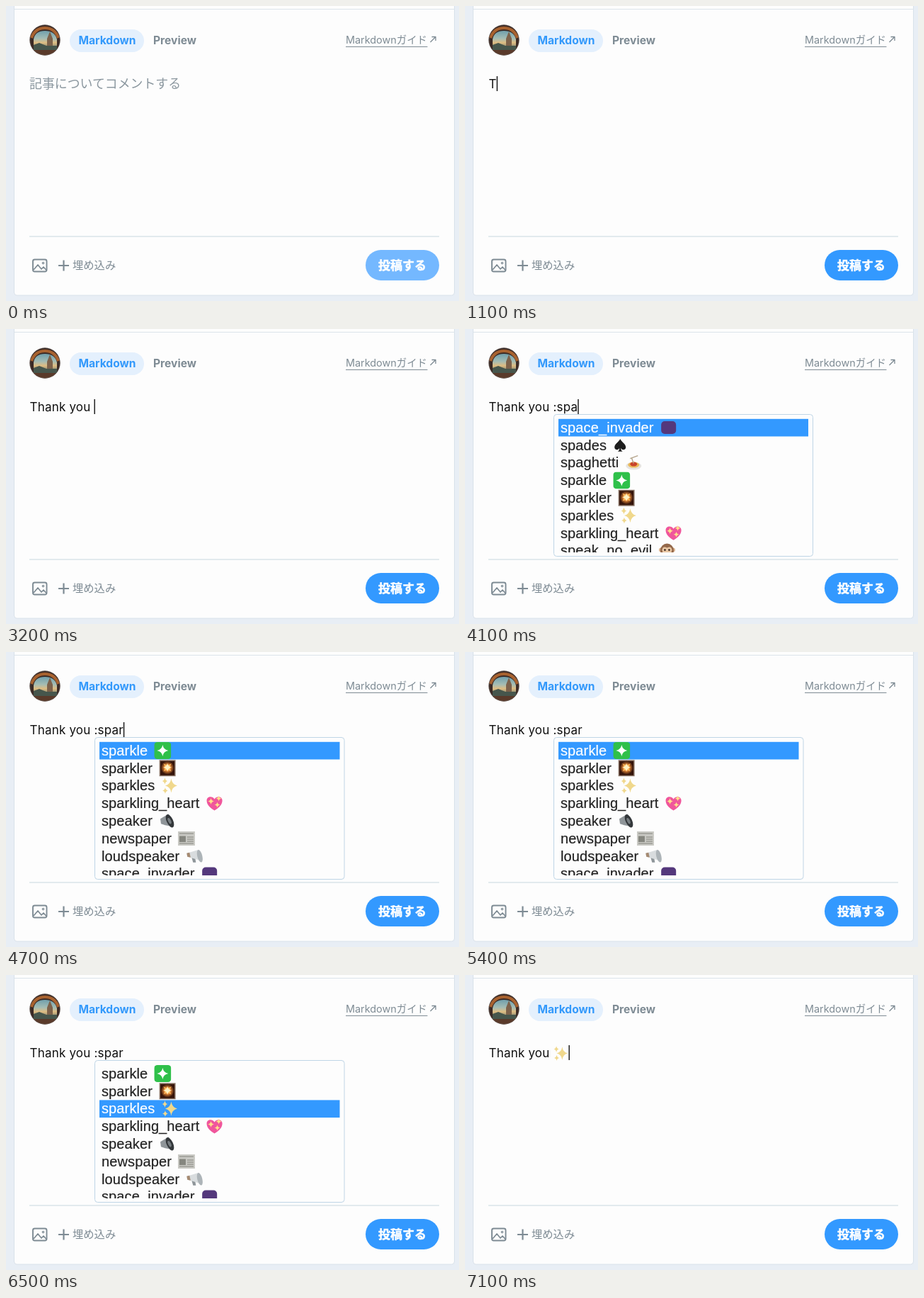
Write an HTML page that moves like this. It is 640x416 px and loops after 7.2 s.

```html
<!DOCTYPE html>
<html lang="ja">
<head>
<meta charset="utf-8">
<title>Comment editor</title>
<style>
  html, body { margin: 0; width: 100%; height: 100%; overflow: hidden; background: #e8eef5; }
  svg { display: block; }
  text { font-family: Inter, "Noto Sans CJK JP", "Noto Sans CJK", sans-serif; fill: #7e8b94; }
  .tab { font-size: 15.6px; font-weight: 700; }
  .link { font-size: 14.4px; }
  .hint { font-size: 17.9px; fill: #8b979f; }
  .typed { font-size: 17px; letter-spacing: .2px; fill: #111; }
  .embed { font-size: 15.3px; }
  .send { font-size: 17px; font-weight: 700; fill: #fff; stroke: #fff; stroke-width: .5; }
  .item { font: 20px "Liberation Sans", Arial, sans-serif; letter-spacing: .12px; fill: #222; stroke: #222; stroke-width: .2; }
  .item.on { fill: #fff; stroke: #fff; }
  .icon { fill: none; stroke: #7e8b94; stroke-width: 1.900; stroke-linejoin: round; }
</style>
</head>
<body>
<svg width="640" height="416" viewBox="0 0 640 416">
  <defs>
    <clipPath id="face"><circle cx="55" cy="48" r="21.5"/></clipPath>
    <clipPath id="listClip"><rect x="125" y="121" width="370" height="194"/></clipPath>
    <linearGradient id="sky" x1="0" y1="0" x2="0" y2="1">
      <stop offset="0" stop-color="#6f9fac"/>
      <stop offset=".4" stop-color="#a5bdb4"/>
      <stop offset=".62" stop-color="#dfbd82"/>
      <stop offset="1" stop-color="#4f6a6b"/>
    </linearGradient>
    <radialGradient id="glow">
      <stop offset="0" stop-color="#fff0c0"/>
      <stop offset=".4" stop-color="#f3913a"/>
      <stop offset="1" stop-color="#35140a"/>
    </radialGradient>
    <path id="star" d="M0-1Q.15-.15 1 0Q.15.15 0 1Q-.15.15-1 0Q-.15-.15 0-1Z"/>

    <symbol id="space_invader" viewBox="0 0 24 24"><rect x="1.500" y="3" width="21" height="18" rx="5" fill="#54387c"/></symbol>
    <symbol id="spades" viewBox="0 0 24 24">
      <path fill="#1d1d1d" d="M10 3C9 7 2 10 2 15C2 19 7 20 9 16Q9 20 6.500 21H13.500Q11 20 11 16C13 20 18 19 18 15C18 10 11 7 10 3Z"/>
    </symbol>
    <symbol id="spaghetti" viewBox="0 0 24 24">
      <ellipse cx="12" cy="16.500" rx="11" ry="5.500" fill="#e6e4e0"/>
      <ellipse cx="12" cy="15" rx="8" ry="4" fill="#eab95a"/>
      <ellipse cx="12" cy="14" rx="5" ry="3" fill="#c9432a"/>
      <path d="M12 13L9 5M7 6L18 2" stroke="#b5a58c" stroke-width="1.500" fill="none"/>
    </symbol>
    <symbol id="sparkle" viewBox="0 0 24 24">
      <rect width="24" height="24" rx="4.500" fill="#2fc04a"/>
      <use href="#star" transform="translate(12 12) scale(8)" fill="#fff"/>
    </symbol>
    <symbol id="sparkler" viewBox="0 0 24 24">
      <rect x=".5" y=".5" width="23" height="23" fill="#8a7567"/>
      <rect x="2" y="2" width="20" height="20" fill="#35140a"/>
      <circle cx="12" cy="11.500" r="9.500" fill="url(#glow)"/>
      <use href="#star" transform="translate(12 11) rotate(45) scale(8)" fill="#ffb85c"/>
      <use href="#star" transform="translate(12 11) scale(6)" fill="#fff3c4"/>
    </symbol>
    <symbol id="sparkles" viewBox="0 0 24 24">
      <g fill="#f0d88c">
        <use href="#star" transform="translate(14 12) scale(8.500 10)"/>
        <use href="#star" transform="translate(5 5.500) scale(4 5)"/>
        <use href="#star" transform="translate(5.500 19) scale(4 4.500)"/>
      </g>
    </symbol>
    <symbol id="sparkling_heart" viewBox="0 0 24 24">
      <path fill="#f0569c" d="M12 22C4 17 1 13 1 8C1 2 9 1 12 6C15 1 23 2 23 8C23 13 20 17 12 22Z"/>
      <g fill="#ffe08a">
        <use href="#star" transform="translate(7 9) scale(4.500)"/>
        <use href="#star" transform="translate(16 14) scale(4)"/>
        <use href="#star" transform="translate(18 5) scale(4)"/>
      </g>
    </symbol>
    <symbol id="speak_no_evil" viewBox="0 0 24 24">
      <g fill="#dcb48f"><circle cx="3.500" cy="11" r="3"/><circle cx="20.500" cy="11" r="3"/></g>
      <circle cx="12" cy="11.500" r="9.500" fill="#94684a"/>
      <path fill="#e8c6a3" d="M5 11Q6 5 12 8Q18 5 19 11Q18 18 12 18Q6 18 5 11Z"/>
      <g fill="#33221a"><circle cx="9" cy="11" r="1.300"/><circle cx="15" cy="11" r="1.300"/></g>
      <ellipse cx="12" cy="18" rx="7" ry="3.500" fill="#94684a"/>
    </symbol>
    <symbol id="speaker" viewBox="0 0 24 24">
      <path fill="#8f9599" d="M2 9L7 6L14 2L20 20L9 18L3 16Z"/>
      <ellipse cx="15.500" cy="12" rx="4.500" ry="10" transform="rotate(-25 15.500 12)" fill="#34383b"/>
      <ellipse cx="15" cy="12" rx="2" ry="4.500" transform="rotate(-25 15 12)" fill="#777d81"/>
    </symbol>
    <symbol id="newspaper" viewBox="0 0 24 24">
      <rect y="2" width="24" height="20" fill="#c9c9c4"/>
      <path d="M2 5H22M2 19H22M13 10H22M13 13H22M13 16H22" stroke="#9a9a94" stroke-width="1.500"/>
      <rect x="2" y="8.500" width="9" height="8.500" fill="#85867f"/>
    </symbol>
    <symbol id="loudspeaker" viewBox="0 0 24 24">
      <path d="M8 14L10 21H14L13 15" fill="#8e9599"/>
      <path fill="#d8dcde" d="M1 8L5 7L18 3L22 19L6 14L2 13Z"/>
      <ellipse cx="19.500" cy="12" rx="3.500" ry="9" transform="rotate(-14 19.500 12)" fill="#adb4b8"/>
      <path d="M1 8L5 7L6.500 14L2 13Z" fill="#a58a72"/>
    </symbol>
  </defs>

  <rect width="640" height="416" fill="#e8eef5"/>
  <rect x="11.500" y="-10" width="622" height="418" rx="4" fill="#fdfdfd" stroke="#d9e2ea"/>
  <path d="M12 4.500H633" stroke="#dbe4ea"/>

  <g clip-path="url(#face)">
    <rect x="33" y="26" width="44" height="44" fill="#3b2a25"/>
    <path d="M39 62V47Q41 35 55 35Q69 35 72 47V62Z" fill="url(#sky)"/>
    <path d="M36 45Q41 31 55 31Q69 31 74 45" fill="none" stroke="#a8622f" stroke-width="4"/>
    <path d="M58 61V46L62 36L66 46V61Z" fill="#7d624b"/>
    <path d="M39 55L47 52L57 56H72V63H39Z" fill="#46564c"/>
    <path d="M33 62H77V70H33Z" fill="#5a3a2a"/>
  </g>
  <circle cx="55" cy="48" r="21.300" fill="none" stroke="#6f6661" stroke-width=".6"/>

  <rect x="90" y="33" width="105" height="32" rx="16" fill="#e4f0fd"/>
  <text class="tab" x="102.500" y="54" style="fill:#3399fb">Markdown</text>
  <text class="tab" x="208" y="54">Preview</text>
  <text class="link" x="480" y="52.500">Markdownガイド</text>
  <path d="M480 57.500H595.500" stroke="#7e8b94"/>
  <path class="icon" style="stroke-width:1.300" d="M599.500 51L607 43.500M601.500 43.500H607V49"/>

  <text id="hint" class="hint" x="33" y="116">記事についてコメントする</text>
  <text id="typed" class="typed" x="33.500" y="116"></text>
  <use id="emoji" href="#sparkles" y="99.500" width="22" height="22"/>
  <rect id="caret" y="99" width="1.400" height="21" fill="#111"/>

  <path d="M33 325H612" stroke="#dae5ea" stroke-width="1.500"/>
  <g class="icon">
    <rect x="38" y="357.500" width="19.500" height="17" rx="2.500"/>
    <path d="M39 372L45 365L50 371L53 368L57.500 373" stroke-width="1.700"/>
    <circle cx="52.500" cy="362.500" r="1.200" stroke-width="1.200"/>
    <path d="M74 366H89M81.500 358.500V373.500" stroke-width="2.200"/>
  </g>
  <text class="embed" x="94" y="371.300">埋め込み</text>
  <rect id="send" x="508" y="344" width="104" height="43" rx="21.500"/>
  <text class="send" x="526" y="371.500">投稿する</text>

  <g id="menu">
    <rect id="box" x="125.500" y="120.500" height="200" rx="4" fill="#fdfdfd" stroke="#bfd5e6"/>
    <rect id="bar" x="132" height="24.700" fill="#3399ff"/>
    <g id="items" clip-path="url(#listClip)"></g>
  </g>
</svg>
<script>
const LOOP = 7200, ROW = 24.8, BLINK = 500;
const $ = id => document.getElementById(id);

const lists = {
  spa: { width: 366, names: 'space_invader spades spaghetti sparkle sparkler sparkles sparkling_heart speak_no_evil'.split(' ') },
  spar: { width: 352.5, names: 'sparkle sparkler sparkles sparkling_heart speaker newspaper loudspeaker space_invader'.split(' ') }
};

// time, text, menu, selected row; '*' stands for the inserted emoji
const steps = [
  [0, ''],
  [900, 'T'], [1300, 'Th'], [1500, 'Tha'], [1700, 'Than'], [1900, 'Thank'], [2100, 'Thank '],
  [2300, 'Thank y'], [2500, 'Thank yo'], [2600, 'Thank you'], [2800, 'Thank you '],
  [3500, 'Thank you :'], [3700, 'Thank you :s'],
  [3900, 'Thank you :sp', 'spa', 0], [4000, 'Thank you :spa', 'spa', 0],
  [4700, 'Thank you :spar', 'spar', 0],
  [5900, 'Thank you :spar', 'spar', 1],
  [6300, 'Thank you :spar', 'spar', 2],
  [6800, 'Thank you *']
];

function make(parent, tag, attrs) {
  const el = document.createElementNS('http://www.w3.org/2000/svg', tag);
  for (const k in attrs) el.setAttribute(k, attrs[k]);
  return parent.appendChild(el);
}

function show(el, on) { el.style.display = on ? '' : 'none'; }

function drawMenu(list, selected) {
  $('items').replaceChildren();
  $('box').setAttribute('width', list.width);
  $('bar').setAttribute('width', list.width - 13);
  $('bar').setAttribute('y', 126.8 + selected * ROW);
  list.names.forEach((name, i) => {
    const y = 139 + i * ROW;
    const label = make($('items'), 'text', { class: i === selected ? 'item on' : 'item', x: 135, y: y + 6.8 });
    label.textContent = name;
    make($('items'), 'use', {
      href: '#' + name, x: 144 + label.getComputedTextLength(), y: y - 12, width: 24, height: 24
    });
  });
}

function apply([, text, menu, selected]) {
  const hasEmoji = text.endsWith('*');
  $('typed').textContent = text.replace('*', '').replace(/ /g, '\u00a0');
  const end = 33.5 + (text ? $('typed').getComputedTextLength() : 0);
  $('emoji').setAttribute('x', end);
  $('caret').setAttribute('x', end + (hasEmoji ? 22 : 0));
  show($('emoji'), hasEmoji);
  show($('hint'), !text);
  show($('menu'), menu);
  if (menu) drawMenu(lists[menu], selected);
}

const mix = (a, b, k) => Math.round(a + (b - a) * k);
let current = -1;

function render(t) {
  const index = steps.findLastIndex(s => s[0] <= t);
  if (index !== current) apply(steps[current = index]);

  // The caret stays solid after an edit, then blinks.
  const edit = steps.find(s => s[1] === steps[index][1])[0] || -BLINK;
  show($('caret'), (t - edit) % (2 * BLINK) < BLINK);

  const k = Math.min(1, Math.max(0, (t - steps[1][0]) / 200));
  $('send').setAttribute('fill', `rgb(${mix(116, 51, k)},${mix(184, 153, k)},255)`);
}

const start = performance.now();
function tick() {
  render((performance.now() - start) % LOOP);
  requestAnimationFrame(tick);
}
tick();
</script>
</body>
</html>
```
